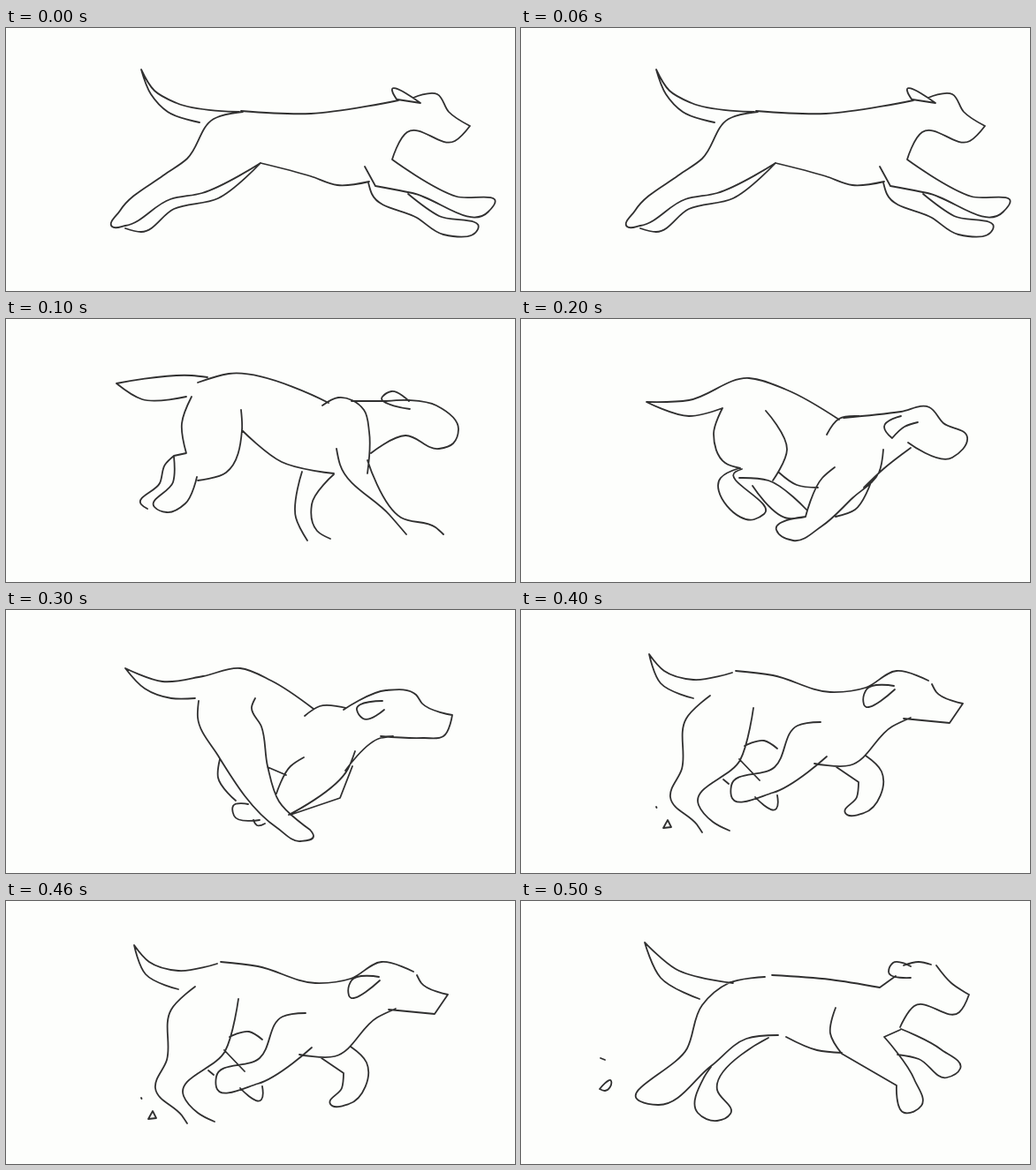
An HTML page that plays this animation: 576x298 px, repeating every 0.6 s.

```html
<!DOCTYPE html>
<html lang="en">
<head>
<meta charset="utf-8">
<title>Running dog</title>
<style>
  html, body { margin: 0; width: 100%; height: 100%; overflow: hidden; background: #fdfefc; }
  svg { display: block; width: 100%; height: 100%; }
  path { fill: none; stroke: #303030; stroke-width: 1.8; stroke-linecap: round; stroke-linejoin: round; }
</style>
</head>
<body>
<svg id="stage" viewBox="0 0 576 298"></svg>
<script>
const STEP = 100;

// Key points of each pen stroke; "!" marks a sharp corner.
const stretch = {
  tail: '264,95 193,85 168,71 153,47! 164,75 183,95 219,107',
  back: '266,94 345,97 444,82',
  hindNear: '268,95 235,103 205,148 178,167 129,207 120,225 135,224 186,194 222,187 288,153',
  hindFar: '135,227 153,231 190,205 240,193 288,153',
  belly: '288,153 345,168 375,178 411,174',
  elbow: '406,157 418,179',
  foreNear: '418,179 460,187 546,208 553,199 510,191 437,149',
  head: '437,149 454,118 508,128 525,111! 501,95 488,75 461,79',
  ear: '443,82 437,71 469,85! 443,81',
  foreFar: '410,175 414,188 465,215 495,234 534,228 490,213 455,188'
};

const land = {
  tail: '228,66 210,64 125,73! 154,91 204,88',
  back: '217,72 252,62 365,95',
  shoulder: '358,98 376,89 405,103 411,128 409,175',
  ear: '457,102 426,88 436,82 456,93',
  head: '391,93 430,93! 456,92 487,98 512,125 506,141 490,147 452,132 413,152',
  rump: '210,88 199,118 204,152! 190,155',
  hindFar: '190,155 180,165 174,186 153,210 160,215',
  hindNear: '190,156 189,185 168,213 182,219 203,209 216,179',
  thigh: '217,183 249,174 267,126 266,103',
  belly: '267,126 312,162 371,175',
  foreFarBack: '335,173 328,225 341,251',
  foreFarFront: '371,176 346,210 352,240 367,249',
  foreNearBack: '374,147 378,165 434,222 453,244',
  foreNearFront: '409,160 447,225 486,236 495,244'
};

const gather = {
  tail: '228,101 190,110 142,94! 190,92 258,67 300,80 360,114',
  rump: '228,101 218,130 231,163 248,169',
  shoulder: '346,131 360,113 382,110',
  head: '365,112 430,105 462,100 478,118 505,134 488,157 438,140',
  ear: '430,110 411,122 420,135! 434,122 449,117',
  thigh: '277,104 301,148 285,183',
  hindFar: '247,169 226,180 264,227 275,221 243,173 250,170',
  hindNear: '247,180 280,183 323,216',
  heel: '262,189 303,226 322,224',
  belly: '292,174 312,188 336,191',
  foreNear: '355,168 341,180 322,224! 289,239 308,251 340,235 375,203 405,174 410,148',
  chest: '441,146 410,170 388,191',
  foreFar: '396,185 378,216 356,224'
};

const cross = {
  tail: '214,100 187,100 157,89 135,66! 177,81 223,75 265,66 300,80 348,112',
  shoulder: '338,120 355,109 385,111',
  head: '382,113 430,91 464,96 471,106 505,119! 495,143 472,145 424,143',
  neck: '438,143 424,145 384,182',
  ear: '426,103 397,113 404,123 428,113',
  hindNear: '218,103 217,122 240,165 307,247 333,262 348,256 344,249',
  thigh: '282,100 278,110 289,132 296,177 309,217 344,249',
  hindFar: '242,169 240,190 260,216',
  paw: '274,220 257,222 258,233 287,238',
  toe: '280,238 284,244 293,242',
  belly: '296,178 317,187',
  elbow: '337,167 322,177 306,208',
  foreNear: '395,160 387,180 320,232',
  foreFar: '392,177 378,213! 322,232'
};

const push = {
  tail: '239,71 195,79 162,69 145,50! 158,83 195,100',
  back: '243,69 285,74 350,93 390,88 425,69 461,80',
  head: '465,84 470,93 500,106! 485,128! 433,123',
  ear: '422,86 391,90 388,107 423,90',
  neck: '441,122 420,132 372,176 332,174',
  hindNear: '214,97 187,123 182,180 169,212 199,243 205,252',
  thigh: '263,111 248,170 201,221 217,240 236,250',
  foreNear: '339,127 313,131 287,178 238,199 238,211 285,207 346,166',
  knee: '253,154 275,148 290,157',
  shin: '247,169 270,193',
  paw: '265,212 289,225 290,210',
  hock: '229,192 235,197',
  foreFar: '357,178 382,195! 380,212 367,230 388,230 408,183 390,165',
  speck: '153,223 153.5,224',
  clod: '161,247! 166,238! 170,246! 161,247'
};

const leap = {
  tail: '240,93 175,77 140,47! 158,87 202,111',
  hindNear: '276,86 235,93 205,118 188,167 135,227 155,231 215,187 255,156 291,152',
  back: '284,84 350,89 406,98! 424,85',
  ear: '441,87 416,80 421,70 441,74',
  brow: '433,73 450,69 464,72',
  head: '470,73 487,93 507,106! 496,126 445,119 429,143',
  belly: '300,154 335,169 363,172',
  shoulder: '356,121 350,150 363,173',
  foreNear: '363,173 425,209! 434,240 453,232 445,202 411,154! 429,146',
  foreFar: '430,145 475,168 497,190 482,200 450,179 426,174',
  hindFar: '280,155 222,214 237,241 222,249 200,240 207,200 215,188',
  speck: '90,178 95,180',
  clod: '89,213 102,204 95,215 89,213'
};

const poses = [stretch, land, gather, cross, push, leap];

const sub = (a, b) => [a[0] - b[0], a[1] - b[1]];
const move = (p, v, s) => [p[0] + v[0] * s, p[1] + v[1] * s];
const unit = v => move([0, 0], v, 1 / (Math.hypot(...v) || 1));

// Heading at a point: the nearer neighbour counts more; ends and corners have none.
function heading(pts, i, sharp) {
  if (sharp || i === 0 || i === pts.length - 1) return [0, 0];
  const a = sub(pts[i], pts[i - 1]), b = sub(pts[i + 1], pts[i]);
  return unit(move(move([0, 0], unit(a), Math.hypot(...b)), unit(b), Math.hypot(...a)));
}

function smooth(text) {
  const keys = text.split(' ');
  const pts = keys.map(k => k.split(',').map(parseFloat));
  const dirs = pts.map((p, i) => heading(pts, i, keys[i].endsWith('!')));
  let d = 'M' + pts[0];
  for (let i = 1; i < pts.length; i++) {
    const reach = Math.hypot(...sub(pts[i], pts[i - 1])) / 3;
    d += 'C' + [move(pts[i - 1], dirs[i - 1], reach), move(pts[i], dirs[i], -reach), pts[i]].join(' ');
  }
  return d;
}

const stage = document.getElementById('stage');
const cycle = STEP * poses.length;

poses.forEach((pose, i) => {
  const path = document.createElementNS('http://www.w3.org/2000/svg', 'path');
  path.setAttribute('d', Object.values(pose).map(smooth).join(''));
  stage.append(path);
  path.animate([
    { opacity: 1, offset: 0, easing: 'step-end' },
    { opacity: 0, offset: 1 / poses.length, easing: 'step-end' },
    { opacity: 0, offset: 1 }
  ], { duration: cycle, delay: i * STEP - cycle, iterations: Infinity });
});
</script>
</body>
</html>
```
